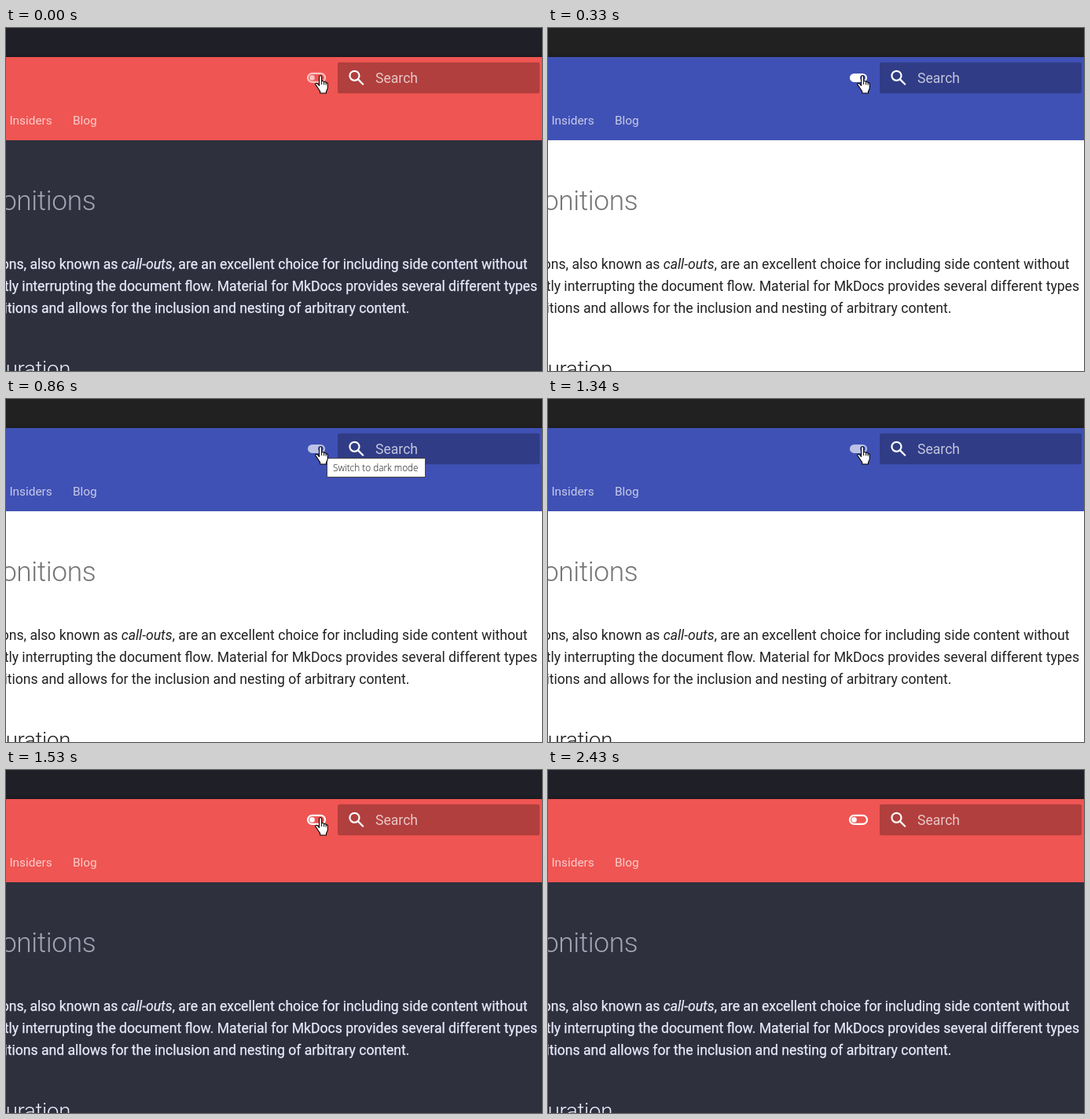
An HTML page that plays this animation: 682 px wide and 437 px high, repeating every 2.75 s.

```html
<!DOCTYPE html>
<html lang="en">
<head>
<meta charset="utf-8">
<title>Palette toggle</title>
<style>
  html, body { margin: 0; width: 100%; height: 100%; overflow: hidden; }
  svg { display: block; font-family: Roboto, sans-serif; }
  #page {
    --top: #212121; --primary: #4051b5; --bg: #fff;
    --text: #212121; --title: #757575; --stroke: 0;
  }
  #page.dark {
    --top: #1e1f27; --primary: #ef5552; --bg: #2e303e;
    --text: #e9ebfc; --title: #a2a4b4; --stroke: .25px;
  }
  #off, .dark #on { display: none; }
  .dark #off { display: inline; }
  .top { fill: var(--top); }
  .header { fill: var(--primary); filter: drop-shadow(0 0 2px #0004); }
  .main { fill: var(--bg); }
  .faint { fill: #fff; fill-opacity: .7; }
  .tabs { font-size: 15.4px; }
  .body { font-size: 17.6px; fill: var(--text); stroke: var(--text); stroke-width: var(--stroke); }
  .head { font-weight: 300; letter-spacing: -.01em; }
  .end { text-anchor: end; }
  .tip { font: 300 11.8px "Open Sans", sans-serif; fill: #111; }
</style>
</head>
<body>
<svg id="page" class="dark" width="682" height="437" viewBox="0 0 682 437">
  <rect class="top" width="682" height="37"/>
  <rect class="header" x="-9" y="37" width="700" height="106"/>
  <rect class="main" y="143" width="682" height="294"/>

  <g id="toggle" fill="#fff" transform="translate(381.8 50.2) scale(1.1)">
    <path id="on" d="M17 7H7a5 5 0 0 0 0 10h10a5 5 0 0 0 0-10m0 8a3 3 0 1 1 0-6 3 3 0 0 1 0 6z"/>
    <path id="off" fill-rule="evenodd" d="M17 6H7a6 6 0 0 0 0 12h10a6 6 0 0 0 0-12m0 10H7a4 4 0 0 1 0-8h10a4 4 0 0 1 0 8M7 9a3 3 0 1 0 0 6 3 3 0 0 0 0-6z"/>
  </g>

  <rect x="422" y="43.8" width="257" height="39.4" rx="2.2" fill="#000" fill-opacity=".26"/>
  <g transform="translate(433 50.4) scale(1.1)" fill="none" stroke="#fff" stroke-width="2">
    <circle cx="9.5" cy="9.5" r="5.5"/>
    <path d="M13.6 13.6l6.2 6.2"/>
  </g>
  <text class="faint" x="470" y="70" font-size="17.6">Search</text>
  <g class="faint tabs">
    <text x="4.4" y="123">Insiders</text>
    <text x="85" y="123">Blog</text>
  </g>

  <text class="head end" x="114.2" y="232" font-size="35.2" fill="var(--title)">Admonitions</text>
  <g class="body end">
    <text x="663.4" y="307">Admonitions, also known as <tspan font-style="italic">call-outs</tspan>, are an excellent choice for including side content without</text>
    <text x="676" y="335">significantly interrupting the document flow. Material for MkDocs provides several different types</text>
    <text x="513.4" y="363">admonitions and allows for the inclusion and nesting of arbitrary content.</text>
  </g>
  <text class="head end" x="82" y="444" font-size="27.5" fill="var(--text)">Configuration</text>

  <g id="tip">
    <rect x="408.5" y="75.5" width="125" height="24" fill="#fff" stroke="#444"/>
    <text class="tip" x="416" y="92">Switch to dark mode</text>
  </g>

  <g id="hand" stroke="#000" stroke-linejoin="round">
    <path fill="#fff" stroke-width="1.1" d="M398.5 73.5V62.3a1.6 1.6 0 0 1 3.2 0v5.4q2.7-.6 2.9 1 2.3-.5 2.5 1 2.2-.2 2.2 1.8v4.6q0 2.2-1.8 4.6v2.3h-7.8v-2.1q-1.5-2.2-3-4.6-1.4-2.3-2.7-3.9-.9-1.5.6-2 1.9-.4 3.9 3.1z"/>
    <path fill="none" d="M401.7 67.7v4.3M404.6 68.7v3.6M407.1 69.7v3"/>
  </g>
</svg>
<script>
  const LOOP = 2750, TO_LIGHT = 330, TO_DARK = 1530, LEAVE = 1940;
  const [page, toggle, tip, hand] =
    ["page", "toggle", "tip", "hand"].map(id => document.getElementById(id));
  const show = (el, on) => el.style.display = on ? "" : "none";

  // Progress from 0 to 1 in `count` equal steps
  const steps = (t, start, length, count) =>
    Math.max(0, Math.min(count, Math.floor((t - start) / length))) / count;

  // How far the toggle has faded to its hover opacity
  function hover(t) {
    if (t < TO_LIGHT) return 1;
    if (t < TO_DARK) return steps(t, TO_LIGHT, 70, 4);
    return steps(t, TO_DARK, 90, 3) - steps(t, LEAVE, 70, 4);
  }

  function draw(now) {
    const t = now % LOOP;
    page.classList.toggle("dark", t < TO_LIGHT || t >= TO_DARK);
    toggle.setAttribute("opacity", 1 - .35 * hover(t));
    show(tip, t >= 860 && t < 1340);

    const p = steps(t, LEAVE - 70, 70, 8);
    show(hand, p < 1);
    hand.setAttribute("transform", `translate(${60 * p} ${380 * p * p})`);
    requestAnimationFrame(draw);
  }
  requestAnimationFrame(draw);
</script>
</body>
</html>
```
